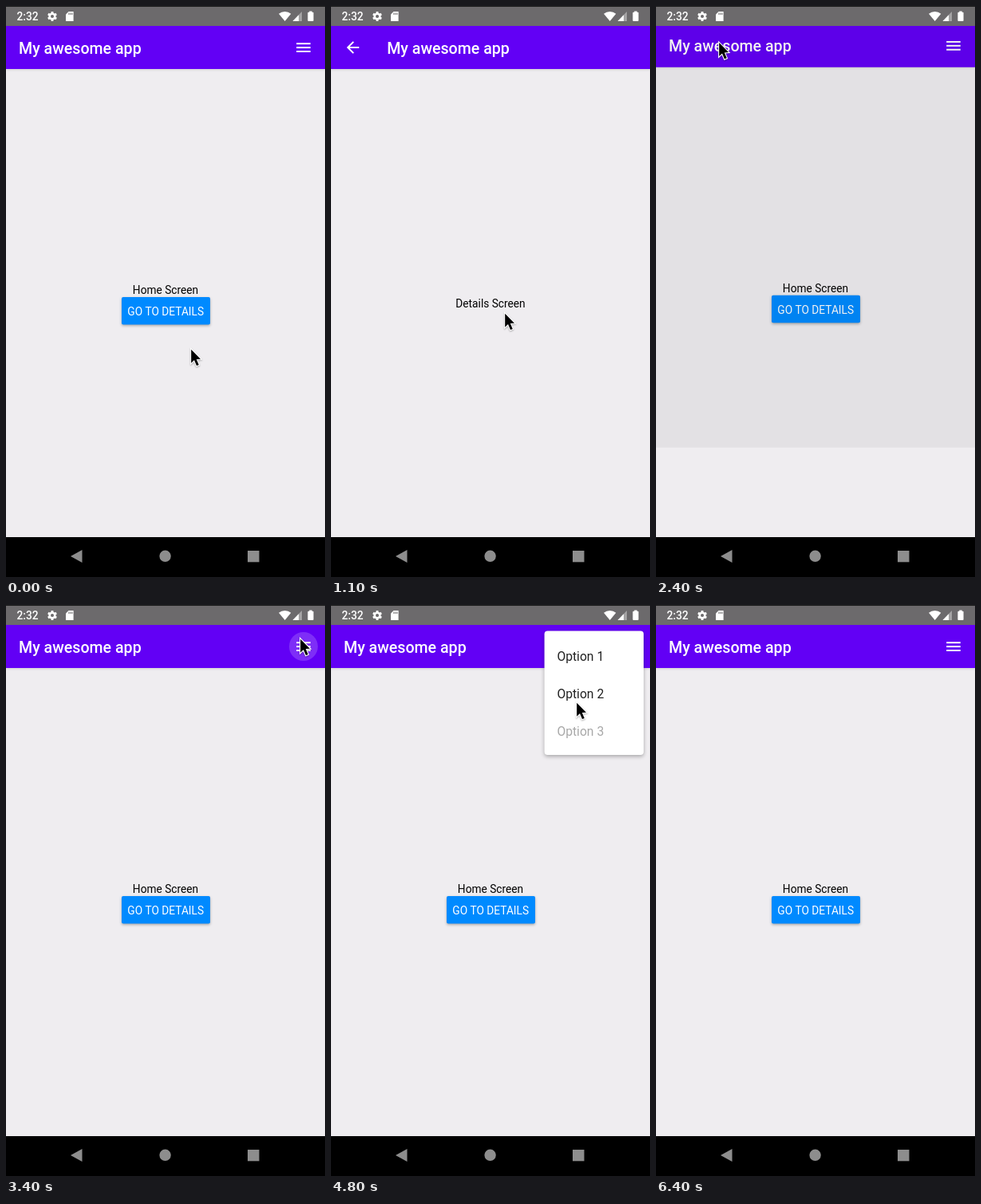
Animation, 400 px wide and 716 px high, one loop 6800 ms. Source, as an HTML page with a canvas:

```html
<!DOCTYPE html>
<html lang="en">
<head>
<meta charset="utf-8">
<title>App bar demo</title>
<style>
html, body { margin: 0; width: 100%; height: 100%; overflow: hidden; background: #000; }
canvas { display: block; width: 400px; height: 716px; }
</style>
</head>
<body>
<canvas id="stage"></canvas>
<script>
const W = 400, H = 716, LOOP = 6800, TICK = 100;
const TOP = 25, BOTTOM = 666, VIEW = BOTTOM - TOP;
const DP = 0.98;
const PAPER = '#efedf0', PURPLE = '#6200f5', GRAY = '#6c6a6c';

const OPEN = 678, CLOSE = 2292, MENU_IN = 3640, MENU_OUT = 5560;
const START = { x: 232, y: 430 };
const MOVES = [
  { at: 50, time: 350, x: 218, y: 385 },
  { at: 1150, time: 650, x: 28, y: 46 },
  { at: 2200, time: 820, x: 369, y: 42 },
  { at: 4100, time: 600, x: 308, y: 122 },
  { at: 4800, time: 600, x: 200, y: 290 },
  { at: 5800, time: 450, x: -30, y: 530 }
];

const canvas = document.getElementById('stage');
const dpr = window.devicePixelRatio || 1;
canvas.width = W * dpr;
canvas.height = H * dpr;
const ctx = canvas.getContext('2d');

const span = (t, start, time) => Math.max(0, Math.min(1, (t - start) / time));
const smooth = x => x * x * (3 - 2 * x);

function bezier(x1, y1, x2, y2) {
  const at = (a, b, s) => 3 * (1 - s) * (1 - s) * s * a + 3 * (1 - s) * s * s * b + s * s * s;
  return x => {
    if (x <= 0 || x >= 1) return x;
    let lo = 0, hi = 1;
    for (let i = 0; i < 24; i++) {
      const mid = (lo + hi) / 2;
      if (at(x1, x2, mid) < x) lo = mid; else hi = mid;
    }
    return at(y1, y2, lo);
  };
}
const reveal = bezier(0.208, 0.82, 0.25, 1);
const standard = bezier(0.4, 0, 0.2, 1);

function rect(x, y, w, h, color, r = 0) {
  ctx.fillStyle = color;
  ctx.beginPath();
  ctx.roundRect(x, y, w, h, r);
  ctx.fill();
}

function disc(x, y, r, color) {
  ctx.fillStyle = color;
  ctx.beginPath();
  ctx.arc(x, y, r, 0, 2 * Math.PI);
  ctx.fill();
}

function trace(...points) {
  ctx.beginPath();
  points.forEach(([x, y]) => ctx.lineTo(x, y));
}

function poly(color, ...points) {
  trace(...points);
  ctx.fillStyle = color;
  ctx.fill();
}

function line(color, width, ...points) {
  trace(...points);
  ctx.strokeStyle = color;
  ctx.lineWidth = width;
  ctx.stroke();
}

function text(str, x, y, size, color, weight = 400, align = 'left') {
  ctx.font = `${weight} ${size * DP}px Roboto, sans-serif`;
  ctx.textAlign = align;
  ctx.fillStyle = color;
  ctx.fillText(str, x, y);
}

function raised(alpha, blur, dy, paint) {
  ctx.save();
  ctx.shadowColor = `rgba(0,0,0,${alpha})`;
  ctx.shadowBlur = blur * dpr;
  ctx.shadowOffsetY = dy * dpr;
  paint();
  ctx.restore();
}

function gear(x, y) {
  for (let a = 0; a < 3; a++) {
    const dx = 6 * Math.cos(a * Math.PI / 3 + Math.PI / 6);
    const dy = 6 * Math.sin(a * Math.PI / 3 + Math.PI / 6);
    line('#fff', 2.8, [x - dx, y - dy], [x + dx, y + dy]);
  }
  disc(x, y, 4.6, '#fff');
  disc(x, y, 2, GRAY);
}

function statusBar() {
  rect(0, 0, W, TOP, GRAY);
  rect(0, 0, W, 1, '#1c1c1c');
  text('2:32', 13.5, 18, 14, '#fff', 500);
  gear(58, 13);

  poly('#fff', [78.5, 7], [84.6, 7], [84.6, 19], [75, 19], [75, 10.5]);
  for (let i = 0; i < 3; i++) rect(78.4 + i * 2, 8.6, 1, 2.4, GRAY);

  ctx.fillStyle = '#fff';
  ctx.beginPath();
  ctx.moveTo(349.7, 19);
  ctx.arc(349.7, 19, 12, -Math.PI / 2 - 0.69, -Math.PI / 2 + 0.69);
  ctx.fill();

  poly('#a5a4a5', [371, 7], [371, 19], [359.5, 19]);
  poly('#fff', [367, 11.2], [367, 19], [359.5, 19]);
  rect(380.3, 6.5, 3.4, 2, '#fff');
  rect(378.4, 7.8, 7.2, 11.2, '#fff', 1);
}

function navBar() {
  rect(0, BOTTOM, W, H - BOTTOM, '#000');
  const gray = '#8d8d8d';
  poly(gray, [81, 690], [95.5, 682], [95.5, 698]);
  disc(199.6, 689.8, 7.2, gray);
  rect(303, 683, 14.5, 14.3, gray);
}

function header(x) {
  raised(0.14, 3, 1, () => rect(0, TOP, W, 54, PURPLE));
  text('My awesome app', x, 59.6, 20, '#fff', 500);
}

function ripple(t, start, x) {
  const alpha = 0.18 * (1 - span(t, start + 250, 250));
  disc(x, 52, 18 * span(t, start, 150), `rgba(255,255,255,${alpha})`);
}

function homeScreen(t) {
  rect(0, TOP, W, VIEW + 30, PAPER);
  header(16);
  ripple(t, 3250, 373);
  for (let i = 0; i < 3; i++) rect(364.2, 46.2 + i * 4.9, 17.6, 2, '#fff');
  text('Home Screen', 200, 360.8, 14, '#000', 400, 'center');
  const pressed = span(t, 450, 150) * (1 - span(t, 800, 200));
  raised(0.3, 3.5, 1.5, () => rect(145, 365, 111, 34.6, '#008aff', 2));
  rect(145, 365, 111, 34.6, `rgba(0,0,0,${0.1 * pressed})`, 2);
  text('GO TO DETAILS', 200.2, 387.8, 14, '#fff', 400, 'center');
}

function detailsScreen(t) {
  rect(0, TOP, W, VIEW, PAPER);
  header(70.2);
  ripple(t, 2050, 27.5);
  line('#fff', 2, [35.2, 52], [21.5, 52]);
  line('#fff', 2, [28.2, 44.9], [21.1, 52], [28.2, 59.1]);
  text('Details Screen', 200, 378.4, 14, '#000', 400, 'center');
}

function clipFrom(y) {
  ctx.beginPath();
  ctx.rect(0, y, W, BOTTOM - y);
  ctx.clip();
}

// Home drifts up and dims while the details screen is uncovered from below
function screens(t) {
  const p = reveal(span(t, OPEN, 400)) - reveal(span(t, CLOSE, 345));
  ctx.save();
  clipFrom(TOP);
  ctx.save();
  ctx.translate(0, -0.02 * VIEW * p);
  homeScreen(t);
  ctx.restore();
  rect(0, TOP, W, VIEW, `rgba(0,0,0,${Math.min(0.1, 0.3 * p)})`);
  clipFrom(TOP + VIEW * (1 - p));
  ctx.translate(0, 0.041 * VIEW * (1 - p));
  detailsScreen(t);
  ctx.restore();
}

function menu(t) {
  const grow = standard(span(t, MENU_IN, 250));
  const alpha = grow * (1 - standard(span(t, MENU_OUT, 250)));
  if (alpha <= 0) return;
  ctx.save();
  ctx.globalAlpha = alpha;
  ctx.translate(392, 32.5);
  ctx.scale(grow, grow);
  ctx.translate(-392, -32.5);
  raised(0.3, 5, 2, () => rect(267.6, 32.5, 124.4, 155.6, '#fff', 4));
  for (let i = 0; i < 3; i++) {
    text(`Option ${i + 1}`, 283.4, 70.2 + i * 46.7, 16, i < 2 ? '#212121' : '#a8a8a8');
  }
  ctx.restore();
}

function pointer(t) {
  let { x, y } = START;
  for (const move of MOVES) {
    const f = smooth(span(t, move.at, move.time));
    x += (move.x - x) * f;
    y += (move.y - y) * f;
  }
  ctx.save();
  ctx.translate(x + 0.2, y + 0.7);
  trace([0, 0], [0, 17], [3.8, 13.4], [6.8, 20.4], [9.6, 19.2], [6.6, 12.4], [11.8, 12]);
  ctx.closePath();
  ctx.strokeStyle = '#fff';
  ctx.lineWidth = 2.2;
  raised(0.3, 2, 1, () => ctx.stroke());
  ctx.fillStyle = '#000';
  ctx.fill();
  ctx.restore();
}

function draw(t) {
  ctx.setTransform(dpr, 0, 0, dpr, 0, 0);
  screens(t);
  statusBar();
  navBar();
  menu(t);
  pointer(t);
}

const begin = performance.now();
function loop() {
  const t = (performance.now() - begin) % LOOP;
  draw(Math.floor(t / TICK) * TICK);
  requestAnimationFrame(loop);
}
loop();
</script>
</body>
</html>
```
